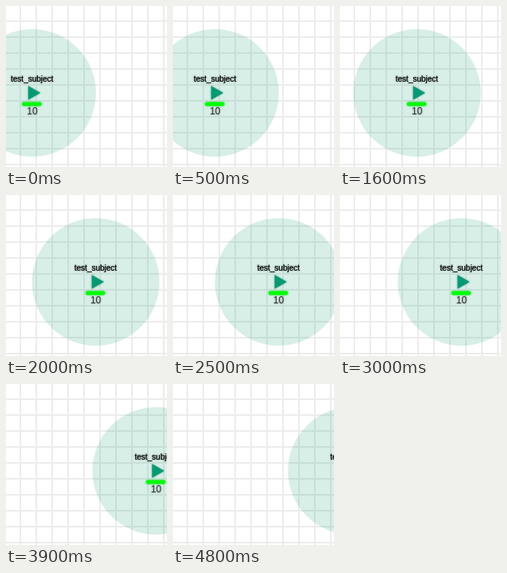
Animation of 202x202 px, one loop 4900 ms. Source, as an HTML page:

```html
<!DOCTYPE html>
<html lang="en">
<head>
<meta charset="utf-8">
<style>
  html, body { margin: 0; width: 100%; height: 100%; overflow: hidden; background: #fff; }
  svg { display: block; width: 100vw; height: 100vh; }
  text { font-family: "Liberation Sans", Arial, sans-serif; text-anchor: middle; }
</style>
</head>
<body>
<svg viewBox="0 0 202 202">
  <defs>
    <pattern id="grid" x="17" y="18" width="20" height="20" patternUnits="userSpaceOnUse">
      <path d="M1 0V20M0 1H20" stroke="#000" stroke-opacity=".075" stroke-width="2" fill="none"/>
    </pattern>
    <filter id="glow" x="-50%" y="-100%" width="200%" height="300%">
      <feDropShadow dx="0" dy="0" stdDeviation="1.3" flood-color="#000" flood-opacity=".45"/>
    </filter>
    <filter id="greenGlow" x="-50%" y="-100%" width="200%" height="300%">
      <feDropShadow dx="0" dy="0" stdDeviation="1.2" flood-color="#0c3" flood-opacity=".7"/>
    </filter>
  </defs>
  <rect width="202" height="202" fill="url(#grid)"/>
  <g id="unit">
    <circle r="80" fill="#009966" fill-opacity=".155"/>
    <path d="M-5-8.7L10.2 0L-5 8.7Z" fill="#009b72" filter="url(#glow)"/>
    <rect x="-12.7" y="11.5" width="24.4" height="5" rx="2" fill="#0f0" filter="url(#greenGlow)"/>
    <text x="-.2" y="-14" font-size="10" stroke="#000" stroke-width=".2" filter="url(#glow)">test_subject</text>
    <text y="27" font-size="12" fill="#333" filter="url(#glow)">10</text>
  </g>
</svg>
<script>
  const LOOP = 4900, STEP = 100, START_X = 32.9, STEP_X = 3.985, CENTER_Y = 109;
  const unit = document.getElementById("unit");

  function draw(time) {
    const step = Math.floor((time % LOOP) / STEP);
    unit.setAttribute("transform", `translate(${START_X + step * STEP_X} ${CENTER_Y})`);
  }

  const start = performance.now();
  function tick() {
    draw(performance.now() - start);
    requestAnimationFrame(tick);
  }
  tick();
</script>
</body>
</html>
```
